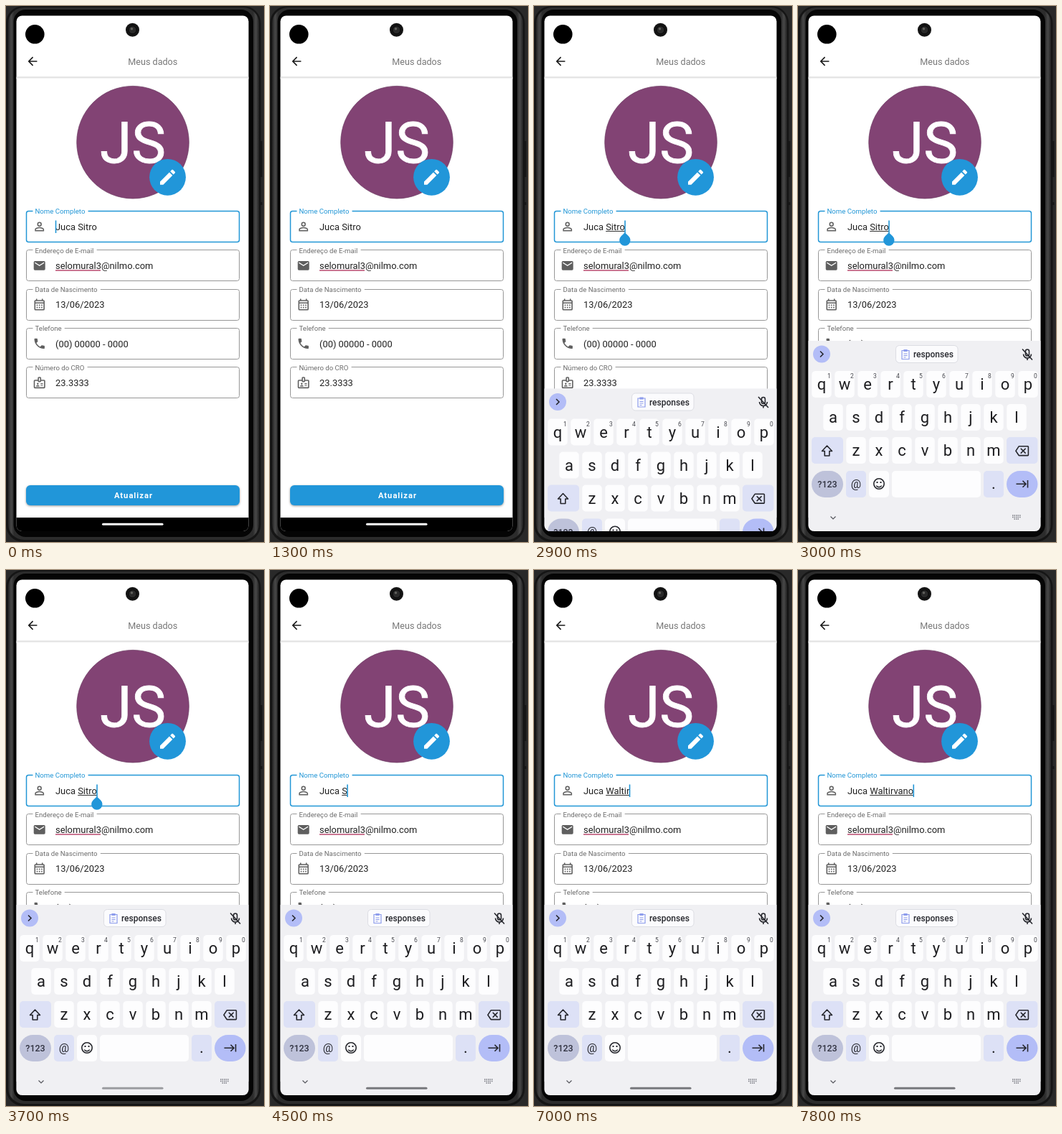
An HTML page for the animation above (8000 ms loop, 360 px wide and 746 px high).

```html
<!DOCTYPE html>
<html lang="pt-BR">
<head>
<meta charset="utf-8">
<title>Meus dados</title>
<style>
  html, body { margin: 0; width: 100%; height: 100%; overflow: hidden; background: #292929; }
  svg { display: block; width: 360px; height: 746px; }
  text { font-family: Roboto, sans-serif; white-space: pre; }
  .value { font-size: 12.9px; fill: #212121; }
  .label { font-size: 9.65px; fill: #6c6c6c; }
  .icon { fill: #5f5f5f; fill-rule: evenodd; }
  .box { fill: none; stroke: #979797; stroke-width: 1; }
  .focus .box { stroke: #2196d6; stroke-width: 1.5; }
  .focus .label { fill: #2196d6; }
  .button { fill: #2196d9; filter: drop-shadow(0 1.5px 1.5px #0006); }
  .letter { font-size: 22px; fill: #1d1d20; text-anchor: middle; }
  .hint { font-size: 8.5px; fill: #44454c; text-anchor: middle; }
  .line { fill: none; stroke: #26272d; stroke-width: 1.6; }
</style>
</head>
<body>
<svg viewBox="0 0 360 746">
  <defs>
    <clipPath id="screen"><rect x="14.5" y="13.5" width="324" height="717.5" rx="8"/></clipPath>
    <linearGradient id="rim">
      <stop offset="0" stop-color="#232323"/><stop offset=".012" stop-color="#484848"/>
      <stop offset=".024" stop-color="#2c2c2c"/><stop offset=".976" stop-color="#2c2c2c"/>
      <stop offset=".988" stop-color="#484848"/><stop offset="1" stop-color="#232323"/>
    </linearGradient>
    <linearGradient id="shade" x2="0" y2="1">
      <stop stop-color="#d5d5d5"/><stop offset="1" stop-color="#fff"/>
    </linearGradient>
  </defs>

  <!-- phone body -->
  <path d="M355 188h2.500v50h-2.500zM355 273h2.500v4h-2.500z" fill="#161616"/>
  <rect x="0" y="0" width="355.500" height="746" rx="24" fill="#151515"/>
  <rect x="3" y="2" width="350" height="741" rx="22" fill="url(#rim)"/>
  <rect x="10.500" y="5" width="334.500" height="734" rx="17" fill="#050505"/>

  <g clip-path="url(#screen)">
    <rect x="14" y="13" width="325" height="719" fill="#fff"/>
    <rect x="14" y="98.500" width="325" height="3" fill="url(#shade)"/>
    <path fill="#1b1b1b" transform="translate(27.400 67.400) scale(.8)"
      d="M20 11H7.83l5.59-5.59L12 4l-8 8 8 8 1.41-1.41L7.83 13H20z"/>
    <text x="170.300" y="81.800" font-size="12.6" fill="#777">Meus dados</text>

    <circle cx="177" cy="189.700" r="78.300" fill="#824374" stroke="#6b3a61" stroke-width=".7"/>
    <text x="177" y="218.300" font-size="80.5" fill="#fff" stroke="#fff" stroke-width=".8" text-anchor="middle">JS</text>
    <circle cx="225.500" cy="238.300" r="25.400" fill="#2196d9"/>
    <path fill="#fff" transform="translate(211.500 224.200) scale(1.17)"
      d="M3 17.25V21h3.75L17.81 9.94l-3.75-3.75zM20.71 7.04c.39-.39.39-1.02 0-1.41l-2.34-2.34c-.39-.39-1.02-.39-1.41 0l-1.83 1.83 3.75 3.75z"/>

    <g id="fields"></g>
    <path d="M69 368h63" stroke="#b8486e" stroke-width="1.5"/>
    <path id="underline" stroke="#333" stroke-width="1"/>
    <rect id="caret" y="298.500" width="1.6" height="17.500" fill="#2196d6"/>
    <path id="handle" fill="#2196d9" d="M0-10.8L5.4-5.4A7.7 7.7 0 1 1-5.4-5.4Z"/>

    <rect class="button" x="28" y="667" width="298" height="28" rx="6"/>
    <text x="178" y="685" font-size="11.2" font-weight="700" letter-spacing="1" fill="#fff" text-anchor="middle">Atualizar</text>
    <rect x="14" y="712" width="325" height="20" fill="#000"/>
    <rect x="134" y="719.800" width="85.500" height="3" rx="1.500" fill="#fff"/>

    <g id="keyboard">
      <rect x="14" y="466" width="325" height="300" fill="#f0f0f3"/>
      <circle cx="33" cy="484.500" r="12" fill="#b3bdf7"/>
      <path class="line" d="M31 480.5l4 4-4 4"/>
      <rect x="136.500" y="472.500" width="86.500" height="24" rx="5" fill="#fbfbfd" stroke="#dcdde3"/>
      <path fill="none" stroke="#8d9cec" stroke-width="1.2" d="M145 479.5h10v12h-10zM148 478.5h4v2h-4zM147.5 484h5M147.5 486.5h5M147.5 489h3"/>
      <text x="161" y="489.300" font-size="12" font-weight="500" fill="#26272d">responses</text>
      <g class="line">
        <rect x="317.500" y="478" width="5" height="9" rx="2.500"/>
        <path d="M314.5 484.5a5.5 5.5 0 0 0 11 0M320 490v3M313 477.5l14 15"/>
      </g>
      <g id="keys"></g>
      <path class="line" d="M40.5 612l7 7.5h-3.7v6.5h-6.6v-6.5h-3.7z" stroke-linejoin="round"/>
      <path fill="#26272d" fill-rule="evenodd" transform="translate(303 609.600) scale(.8)"
        d="M22 3H7c-.69 0-1.23.35-1.59.88L0 12l5.41 8.11c.36.53.9.89 1.59.89h15a2 2 0 0 0 2-2V5a2 2 0 0 0-2-2zm0 16H7.07L2.4 12l4.66-7H22zm-11.59-2L14 13.41 17.59 17 19 15.59 15.41 12 19 8.41 17.59 7 14 10.59 10.41 7 9 8.41 12.59 12 9 15.59z"/>
      <text x="41" y="670" font-size="12.5" font-weight="500" fill="#303240" text-anchor="middle">?123</text>
      <text x="81" y="670.500" font-size="16" fill="#26272d" text-anchor="middle">@</text>
      <text x="273" y="672" class="letter">.</text>
      <circle class="line" cx="113" cy="665" r="7.2"/>
      <path class="line" d="M109.3 667.5a4 3.5 0 0 0 7.4 0"/>
      <path d="M109.5 662h2v2h-2zM114.5 662h2v2h-2z" fill="#26272d"/>
      <path class="line" d="M304.5 665.3h13M313.5 660.8l4.5 4.5-4.5 4.5M320.5 660v10.6"/>
      <path fill="none" stroke="#55565c" stroke-width="1.2" d="M45.5 710.5l3.5 3.5 3.5-3.5"/>
      <path fill="none" stroke="#777981" stroke-width="1.3" stroke-dasharray="1.5 1" d="M299 709h12M299 711.5h12M301.5 714h7"/>
      <rect id="pill" x="134" y="719.800" width="85.500" height="3" rx="1.500" fill="#77787c"/>
    </g>
  </g>

  <circle cx="40.300" cy="39.300" r="13.300" fill="#000"/>
  <circle cx="176.500" cy="33.300" r="9.500" fill="#141414"/>
  <circle cx="176.500" cy="33.300" r="5.500" fill="#292929" stroke="#080808"/>
  <circle cx="175.500" cy="31.800" r="1.800" fill="#60605c"/>
</svg>

<script>
const LOOP = 8000, TEXT_X = 69, TEXT_SIZE = 12.9, FIRST = 'Juca ', TAP = 2500;
const $ = id => document.getElementById(id);
const ruler = document.createElement('canvas').getContext('2d');
ruler.font = '100px Roboto, sans-serif';
const widthOf = (text, size = TEXT_SIZE) => ruler.measureText(text).width * size / 100;

const fields = [
  ['Nome Completo', 'Juca Sitro', 'M12 5.9a2.1 2.1 0 1 1 0 4.2 2.1 2.1 0 0 1 0-4.2zm0 9c2.97 0 6.1 1.46 6.1 2.1v1.1H5.9V17c0-.64 3.13-2.1 6.1-2.1zM12 4a4 4 0 1 0 0 8 4 4 0 0 0 0-8zm0 9c-2.67 0-8 1.34-8 4v3h16v-3c0-2.66-5.33-4-8-4z'],
  ['Endereço de E-mail', 'selomural3@nilmo.com', 'M20 4H4a2 2 0 0 0-2 2v12a2 2 0 0 0 2 2h16a2 2 0 0 0 2-2V6a2 2 0 0 0-2-2zm0 4-8 5-8-5V6l8 5 8-5z'],
  ['Data de Nascimento', '13/06/2023', 'M19 4h-1V2h-2v2H8V2H6v2H5a2 2 0 0 0-2 2v14a2 2 0 0 0 2 2h14a2 2 0 0 0 2-2V6a2 2 0 0 0-2-2zm0 16H5V10h14zm0-12H5V6h14zM9 14H7v-2h2zm4 0h-2v-2h2zm4 0h-2v-2h2zm-8 4H7v-2h2zm4 0h-2v-2h2zm4 0h-2v-2h2z'],
  ['Telefone', '(00) 00000 - 0000', 'M6.62 10.79c1.44 2.83 3.76 5.14 6.59 6.59l2.2-2.2c.27-.27.67-.36 1.02-.24 1.12.37 2.33.57 3.57.57.55 0 1 .45 1 1V20c0 .55-.45 1-1 1-9.39 0-17-7.61-17-17 0-.55.45-1 1-1h3.5c.55 0 1 .45 1 1 0 1.25.2 2.45.57 3.57.11.35.03.74-.25 1.02z'],
  ['Número do CRO', '23.3333', 'M20 7h-5V4a2 2 0 0 0-2-2h-2a2 2 0 0 0-2 2v3H4a2 2 0 0 0-2 2v11a2 2 0 0 0 2 2h16a2 2 0 0 0 2-2V9a2 2 0 0 0-2-2zM11 4h2v5h-2zM20 20H4V9h5a2 2 0 0 0 2 2h2a2 2 0 0 0 2-2h5zM14 13h4v1.5h-4zm0 3h4v1.5h-4zM9 12.5a1.5 1.5 0 1 0 0 3 1.5 1.5 0 0 0 0-3zM6 18.5c0-1.7 2-2 3-2s3 .3 3 2z'],
];

$('fields').innerHTML = fields.map(([label, value, icon], i) => {
  const y = 285.5 + i * 54.3, top = Math.floor(y) + .5;
  const gap = 41 + widthOf(label, 9.65) + 3.5;
  return `<g class="${i ? '' : 'focus'}">
    <path class="box" d="M${gap} ${top}H322.5q3 0 3 3v37q0 3-3 3H31.5q-3 0-3-3v-37q0-3 3-3H37.5"/>
    <text class="label" x="40.5" y="${y + 3.8}">${label}</text>
    <path class="icon" transform="translate(37.1 ${y + 11.9}) scale(.8)" d="${icon}"/>
    <text class="value" x="${TEXT_X}" y="${y + 26.3}">${value}</text></g>`;
}).join('');
const nameText = document.querySelector('.value');

const key = (x, y, w, fill = '#fdfdfe', r = 5) =>
  `<rect x="${x}" y="${y}" width="${w}" height="37" rx="${r}" fill="${fill}"/>`;
const keyRow = (letters, x0, y, hints = '') => [...letters].map((c, i) => {
  const x = x0 + i * 32;
  return key(x - 13.7, y, 27.4) + `<text class="letter" x="${x}" y="${y + 26}">${c}</text>` +
    (hints ? `<text class="hint" x="${x + 10.5}" y="${y + 10}">${hints[i]}</text>` : '');
}).join('');
const pale = '#dde1f6', accent = '#b3bdf7';
$('keys').innerHTML = keyRow('qwertyuiop', 33, 508, '1234567890') + keyRow('asdfghjkl', 49, 554) +
  keyRow('zxcvbnm', 81, 600) + key(19, 600, 44, pale) + key(291, 600, 43.5, pale) +
  key(19, 647, 44, '#bec2da', 18.5) + key(67, 647, 28, pale) + key(99, 647, 28) + key(131, 647, 124) +
  key(259, 647, 28, pale) + key(291, 647, 43.5, accent, 18.5);

// [time, second word of the name]
const edits = [
  [0, 'Sitro'], [3800, 'Sitr'], [4000, 'Sit'], [4200, 'Si'], [4400, 'S'], [4600, ''],
  [4700, 'W'], [5500, 'Wa'], [5700, 'Waa'], [6200, 'Wa'], [6400, 'Wal'], [6700, 'Walt'],
  [6800, 'Walti'], [7000, 'Waltir'], [7200, 'Waltirv'], [7400, 'Waltirva'],
  [7600, 'Waltirvan'], [7800, 'Waltirvano'],
];
const caretToggles = [0, 100, 500, 1000, 1500, 2000, 2500, 3100, 3600, 5300, 5500];
const progress = (t, from, to) => Math.min(1, Math.max(0, (t - from) / (to - from)));
const show = (id, on) => $(id).setAttribute('visibility', on ? 'visible' : 'hidden');

function render(t) {
  const word = edits.filter(e => e[0] <= t).pop()[1];
  nameText.textContent = FIRST + word;

  const wordX = TEXT_X + widthOf(FIRST), end = wordX + widthOf(word);
  $('caret').setAttribute('x', t < TAP ? TEXT_X - .3 : end - .6);
  show('caret', caretToggles.filter(c => c <= t).length % 2);
  $('handle').setAttribute('transform', `translate(${end} 326)`);
  show('handle', t >= TAP && t < 3800);

  const [from, to] = t < 2900 ? [TEXT_X, TEXT_X + widthOf(FIRST.trim())] : [wordX, end];
  $('underline').setAttribute('d', `M${from} 313.5H${to}`);
  show('underline', t >= TAP && word);

  const hidden = (1 - progress(t, 2810, 2990)) ** 2;
  $('keyboard').setAttribute('transform', `translate(0 ${hidden * 266})`);
  show('keyboard', hidden < 1);
  $('pill').setAttribute('opacity', progress(t, 3250, 3900));
}

let start;
function tick(now) {
  start ??= now;
  render((now - start) % LOOP);
  requestAnimationFrame(tick);
}
render(0);
requestAnimationFrame(tick);
</script>
</body>
</html>
```
